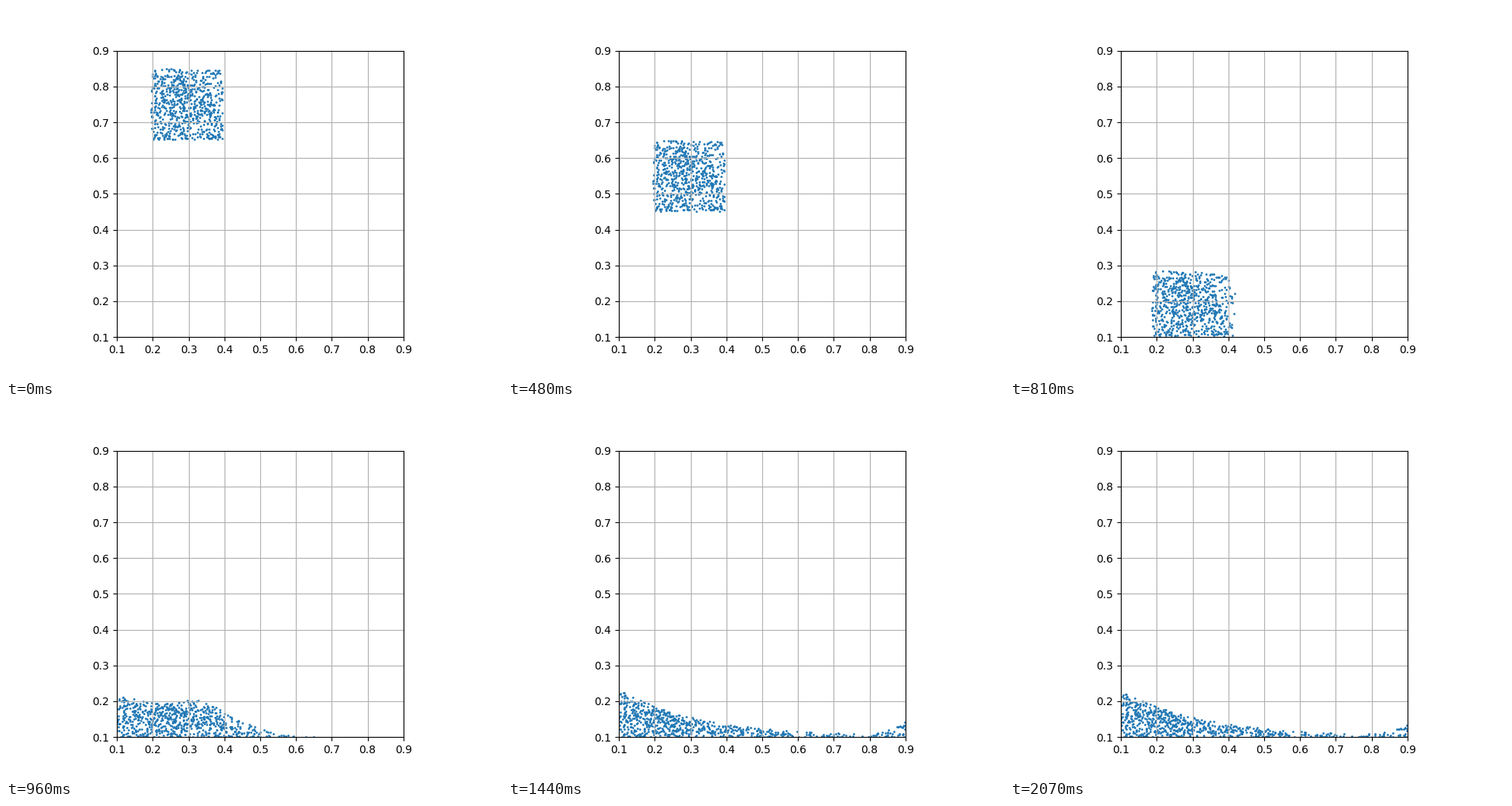
A matplotlib script for the animation above (2100 ms loop, 640x480 px).

```python
import numpy as np
import matplotlib.pyplot as plt
from matplotlib.animation import FuncAnimation

FRAMES, INTERVAL = 70, 30
COUNT = 700
FLOOR, WALL = 0.1, 0.9
FALL = 0.00078                      # drop per squared frame
HIT, SLUMP, SETTLE = 26.5, 32, 40   # stages of the collapse, in frames

rng = np.random.default_rng(8)
u, v = rng.random((2, COUNT))
block = np.column_stack([0.194 + 0.201 * u, 0.651 + 0.198 * v])
xs = np.linspace(FLOOR, WALL, 1601)


def mix(a, b, t):
    return a + (b - a) * t


def pulse(n, peak, width):
    return np.exp(-((n - peak) / width) ** 2)


def surface(n):
    """Height of the material above the floor along xs."""
    left, right = xs - FLOOR, WALL - xs
    ripple = 0.105 + 0.01 * np.cos(2 * np.pi * left / 0.23)
    slump = ripple / (1 + np.exp((xs - 0.44) / 0.05))
    heap = 0.13 * np.exp(-left / 0.24)
    splash = 0.03 * pulse(n, 38, 8) * np.exp(-left / 0.03)
    wave = 0.07 * pulse(n, 57, 17) * np.exp(-right / 0.035)
    t = np.clip((n - SLUMP) / (SETTLE - SLUMP), 0, 1)
    front = 0.7 + 0.05 * (n - SLUMP)
    return np.where(xs <= front, mix(slump, heap + splash + wave, t), 0)


def pour(n):
    """Fill the area under the surface evenly, keeping the particles' order."""
    h = surface(n)
    mass = np.cumsum(h)
    x = np.interp(u * mass[-1], mass, xs)
    return np.column_stack([x, FLOOR + v * np.interp(x, xs, h)])


def drop(n):
    return block - [0, FALL * n * n]


def positions(n):
    if n <= HIT:
        return drop(n)
    if n >= SLUMP:
        return pour(n)
    s = (n - HIT) / (SLUMP - HIT)
    return mix(drop(HIT), pour(SLUMP), np.array([s, 1 - (1 - s) ** 2]))


fig, ax = plt.subplots(figsize=(6.4, 4.8), dpi=100)
dots = ax.scatter(*block.T, s=1, color="tab:blue")
ticks = np.linspace(FLOOR, WALL, 9)
ax.set(xlim=(FLOOR, WALL), ylim=(FLOOR, WALL), aspect="equal",
       xticks=ticks, yticks=ticks)
ax.grid(True)


def update(n):
    dots.set_offsets(positions(n))
    return (dots,)


anim = FuncAnimation(fig, update, frames=FRAMES, interval=INTERVAL,
                     repeat=True, repeat_delay=0)
plt.show()
```
